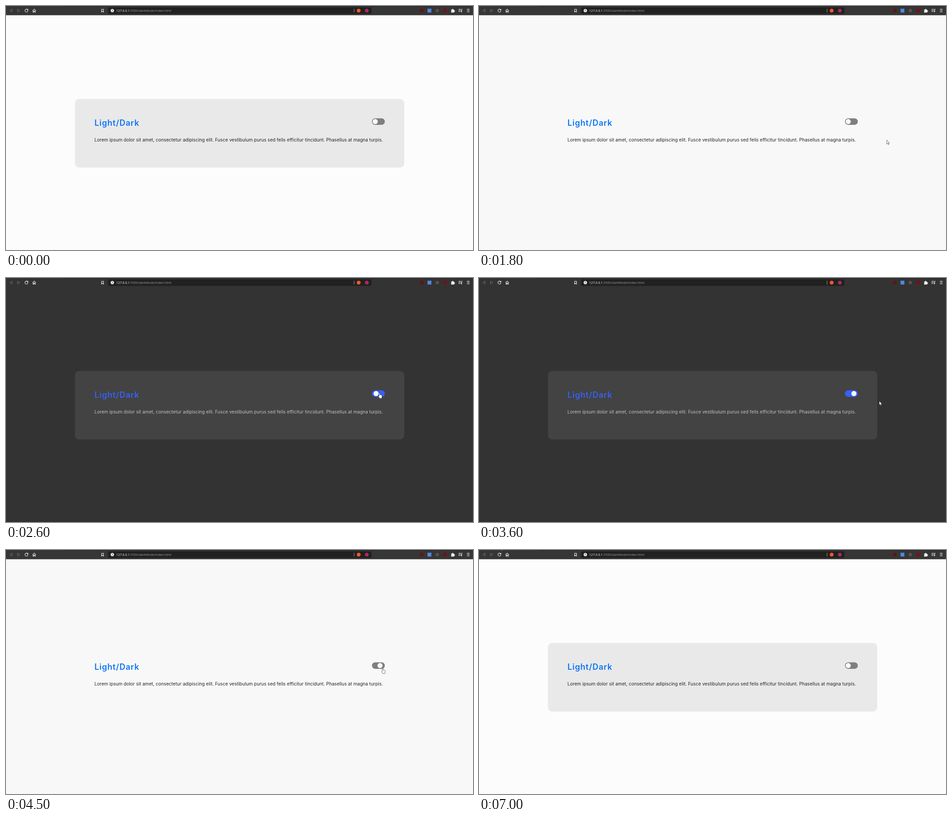
Write an HTML page that moves like this. It is 1032 by 542 pixels and loops after 7.1 s.

```html
<!DOCTYPE html>
<html lang="en">
<head>
<meta charset="utf-8">
<title>Light/Dark</title>
<style>
  html, body { margin: 0; width: 100%; height: 100%; overflow: hidden; }
  svg { display: block; width: 1032px; height: 542px; }
  #stage { --bg: #fcfcfc; --card: #e9e9e9; --bar: #363636; --title: #0d75f8; --text: #222; --track: #7f7f7f; --knob: #fcfcfc; }
  #stage.flat { --bg: #f8f8f8; --card: #f8f8f8; --knob: #f8f8f8; }
  #stage.dark { --bg: #333; --card: #434343; --bar: #333; --title: #3660f5; --text: #c2c2c2; --track: #3660f5; --knob: #fff; }
  #strip { fill: #303030; display: none; }
  .dark #strip { display: inline; }
  .title { font: 600 18px Inter, sans-serif; letter-spacing: .8px; fill: var(--title); }
  .body { font: 10px Inter, sans-serif; letter-spacing: .045px; fill: var(--text); }
  .url { font: 7.06px "Open Sans", "Noto Sans", sans-serif; fill: #999; }
  .line { fill: none; stroke: #eee; stroke-width: 1.1; }
  .dim { stroke: #777; stroke-width: .9; }
  .solid { fill: #eee; }
  .pointer { stroke-width: .7; stroke-linejoin: round; fill: #fff; stroke: #333; }
</style>
</head>
<body>
<svg id="stage" viewBox="0 0 1032 542">
  <rect width="1032" height="542" fill="var(--bg)"/>
  <rect id="strip" y="538" width="1032" height="4"/>

  <rect x="152.3" y="206.5" width="727.7" height="152.2" rx="9" fill="var(--card)"/>
  <text class="title" x="195.5" y="266">Light/Dark</text>
  <text class="body" x="195.6" y="301.3">Lorem ipsum dolor sit amet, consectetur adipiscing elit. Fusce vestibulum purus sed felis efficitur tincidunt. Phasellus at magna turpis.</text>
  <rect x="808.8" y="249.5" width="28.3" height="14.5" rx="7.25" fill="var(--track)"/>
  <circle id="knob" cy="256.7" r="5.6" fill="var(--knob)"/>

  <!-- browser bar -->
  <rect width="1032" height="20.5" fill="var(--bar)"/>
  <rect x="132" width="900" height="1" fill="#242424"/>
  <g class="line">
    <path class="dim" d="M13.5 7v6.4L8 10.2zM25.5 7v6.4L31 10.2z"/>
    <path d="M47.9 8.3A3.3 3.3 0 1 0 48.4 11M48.6 6.6v2.5h-2.5"/>
    <path d="M58.7 10.3 62.3 6.9l3.6 3.4M59.8 9.6v4h1.7v-2.3h1.7v2.3h1.7v-4"/>
    <path d="M211.3 7.2h4.2v6.2l-2.1-1.7-2.1 1.7z"/>
  </g>
  <rect x="225.5" y="3" width="582" height="14.5" rx="2" fill="#212121"/>
  <circle class="solid" cx="235" cy="10.3" r="3.7"/>
  <path d="M235 8v2.8M235 11.6v1.1" stroke="#222"/>
  <text class="url" x="243.6" y="12.9"><tspan fill="#fff">127.0.0.1</tspan>:5500/darkMode/index.html</text>
  <path d="M769.2 6v8.5" stroke="#aaa" stroke-width=".9"/>
  <circle cx="779.3" cy="10.3" r="4.3" fill="#f4552b"/>
  <circle cx="797.3" cy="10.3" r="4.1" fill="#b3275c"/>
  <rect x="915" y="6.5" width="7.5" height="7.5" fill="#601416"/>
  <rect x="931.5" y="6" width="8.5" height="8.5" fill="#5087df"/>
  <circle cx="953" cy="10.3" r="3.7" fill="#664954"/>
  <circle cx="970.2" cy="10.3" r="4" fill="#820c13"/>
  <path class="solid" d="M983.5 8h2.3a1.3 1.3 0 1 1 2.5 0h2.2v2.2a1.3 1.3 0 1 1 0 2.5v1.8h-7v-2.2a1.3 1.3 0 0 0 0-2.5z"/>
  <g class="line">
    <path d="M1000 7.3h5.5M1000 9.7h5.5M1000 12.1h3M1007 12.3V7.2h1.8"/>
    <path d="M1018.7 7.4h5.6M1018.7 10.2h5.6M1018.7 13h5.6"/>
  </g>
  <circle class="solid" cx="1006.1" cy="12.4" r="1.3"/>

  <g id="cursor">
    <path id="arrow" class="pointer" d="M.5.5v8.7l2-1.8 1.5 3.2 1.4-.6L4 6.9h2.6z"/>
    <path id="hand" class="pointer" d="M-.9 7.4V1Q-.9.2 0 .2T.9 1v3.4l2.5.4 1.2.4q.8.3.8 1.2v2.5L4.6 12.4H.2L-2.3 8.4q-.3-.9.4-1.2.6-.2 1 .2z"/>
  </g>
</svg>
<script>
const LOOP = 7100, STEP = 100, SWITCH = 400;
const DARK_ON = 2600, DARK_OFF = 4500;
const FLAT_FROM = 700, FLAT_TO = 5800;
const $ = id => document.getElementById(id);
const stage = $('stage'), knob = $('knob'), cursor = $('cursor'), arrow = $('arrow'), hand = $('hand');

// pointer gestures; it rests between them
const home = { x: 8.5, y: -10.5 };
const moves = [
  { from: 100, to: 400, x: 207, y: 128 },
  { from: 600, to: 1000, x: 953, y: 110 },
  { from: 1000, to: 1200, x: 955, y: 299 },
  { from: 1300, to: 1500, x: 945, y: 321 },
  { from: 1500, to: 2200, x: 832, y: 261 },
  { from: 2300, to: 2500, x: 825.5, y: 255 },
  { from: 2600, to: 2900, x: 884, y: 273 },
  { from: 3700, to: 4400, x: 816.5, y: 258.5 },
  { from: 4400, to: 4500, x: 832.5, y: 262 },
  { from: 4600, to: 4800, x: 953, y: 281 },
  { from: 5700, to: 6300, x: 446, y: 71 },
  { from: 6400, to: 7000, x: 46, y: -9 }
];

const mix = (a, b, k) => a + (b - a) * k;

function ease(t, from, to) {
  const k = Math.min(1, Math.max(0, (t - from) / (to - from)));
  return k * k * (3 - 2 * k);
}

function tipAt(t) {
  return moves.reduce((p, m) => {
    const k = ease(t, m.from, m.to);
    return { x: mix(p.x, m.x, k), y: mix(p.y, m.y, k) };
  }, home);
}

// the knob is one step into its slide when the theme flips
const slide = (t, flip) => ease(t, flip - STEP, flip - STEP + SWITCH);

function draw(now) {
  const t = Math.floor(now % LOOP / STEP) * STEP;
  const dark = t >= DARK_ON && t < DARK_OFF;
  stage.classList.toggle('dark', dark);
  stage.classList.toggle('flat', !dark && t >= FLAT_FROM && t < FLAT_TO);
  knob.setAttribute('cx', mix(815.9, 828.5, slide(t, DARK_ON) - slide(t, DARK_OFF)));

  const { x, y } = tipAt(t);
  const over = x > 808 && x < 837.5 && y > 249 && y < 265;
  cursor.setAttribute('transform', `translate(${x} ${y})`);
  arrow.style.display = over ? 'none' : '';
  hand.style.display = over ? '' : 'none';
}

const began = performance.now();
function tick() {
  draw(performance.now() - began);
  requestAnimationFrame(tick);
}
tick();
</script>
</body>
</html>
```
